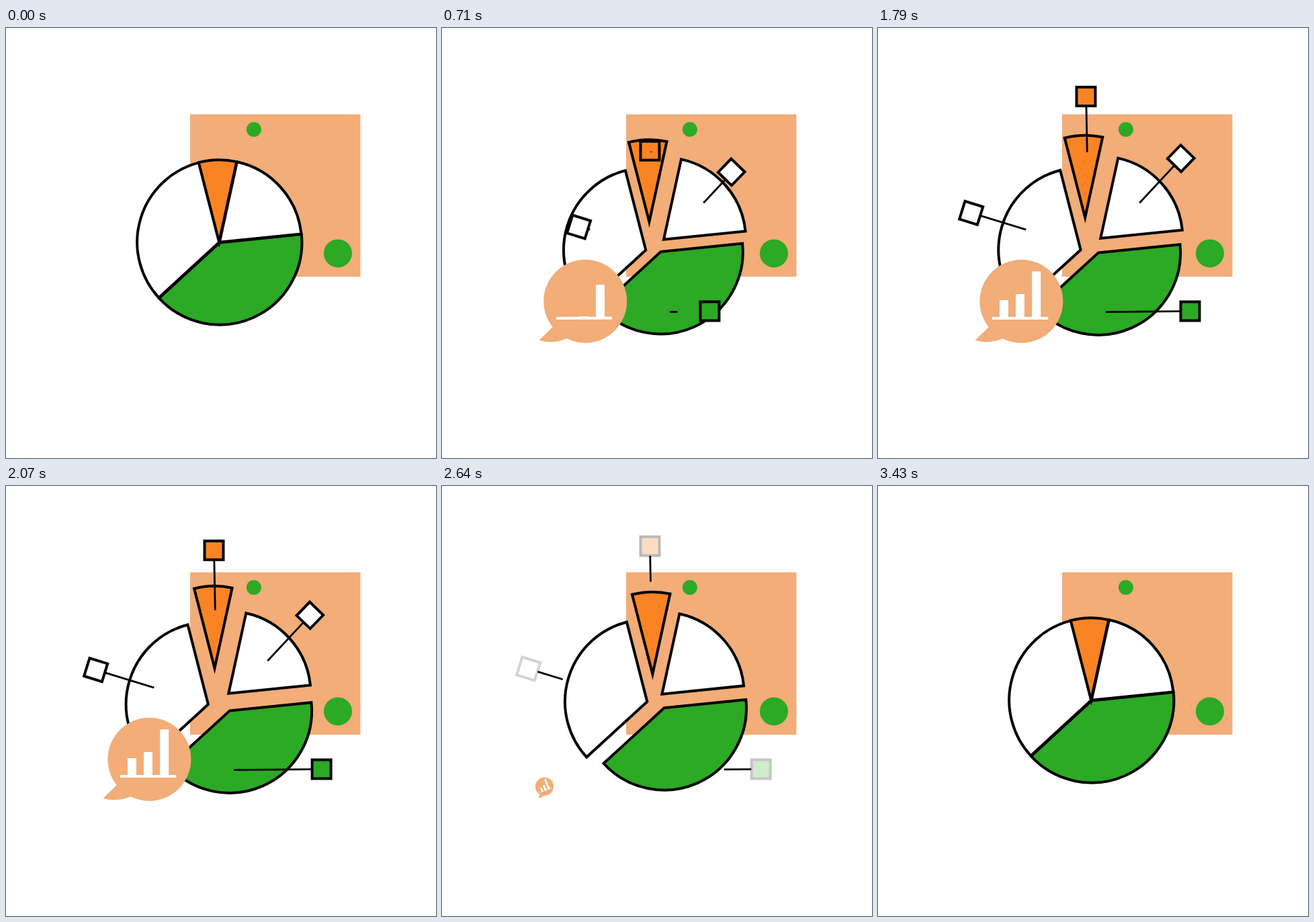
Write an HTML page that moves like this. It is 640 by 640 pixels and loops after 3570 ms.

```html
<!DOCTYPE html>
<html lang="en">
<head>
<meta charset="utf-8">
<title>Pie chart</title>
<style>
  html, body { margin: 0; width: 100%; height: 100%; overflow: hidden; background: #fff; }
  svg { display: block; width: 100vw; height: 100vh; }
</style>
</head>
<body>
<svg id="stage" viewBox="0 0 640 640">
  <rect x="274" y="128.5" width="253.5" height="241.7" fill="#f2ad78"/>
  <circle cx="368.9" cy="151" r="11" fill="#2ca925"/>
  <circle cx="494" cy="335.4" r="21" fill="#2ca925"/>
  <g id="slices" stroke="#000" stroke-width="4" stroke-miterlimit="10"></g>
  <g id="tags" stroke="#000"></g>
  <g id="bubble" fill="#f2ad78">
    <circle cx="213.4" cy="406.8" r="62"/>
    <path d="M144.7 464.7L168 442L190 460.5Q166 471.500 144.700 464.700Z"/>
    <g id="bars" fill="#fff"><rect x="170" y="430" width="83.300" height="4"/></g>
  </g>
</svg>
<script>
const LOOP = 3570, STEP = 71.4, LAST_STEP = 48;
const CENTER = [317.5, 318.8], RADIUS = 122.3;
const GREEN = '#2ca925', ORANGE = '#fa8423', WHITE = '#fff';

const byId = id => document.getElementById(id);
const clamp = v => Math.min(1, Math.max(0, v));
const span = (t, from, to) => clamp((t - from) / (to - from));
const easeOut = u => 1 - (1 - u) ** 3;
const easeInOut = u => (1 - Math.cos(Math.PI * u)) / 2;
const mix = (a, b, k) => a + (b - a) * k;
const mixPoint = (p, q, k) => [mix(p[0], q[0], k), mix(p[1], q[1], k)];

function add(parent, name, attrs) {
  const node = document.createElementNS('http://www.w3.org/2000/svg', name);
  set(node, attrs);
  return parent.appendChild(node);
}

function set(node, attrs) {
  for (const key in attrs) node.setAttribute(key, attrs[key]);
}

function wedge(from, to) {
  const rim = deg => {
    const a = deg * Math.PI / 180;
    return [CENTER[0] + RADIUS * Math.cos(a), CENTER[1] + RADIUS * Math.sin(a)];
  };
  return `M${CENTER}L${rim(from)}A${RADIUS} ${RADIUS} 0 0 1 ${rim(to)}Z`;
}

// open: offset after the pie bursts; far: offset just before it closes
const slices = [
  { from: 137.5, to: 255.6, fill: WHITE, rest: [0, 0], open: [-15.7, 13], far: [-17, 3] },
  { from: -77.7, to: -5.8, fill: WHITE, rest: [0.3, 0], open: [13.5, -4.4], far: [13.5, -12.7] },
  { from: -5.8, to: 137.5, fill: GREEN, rest: [0.6, 0.6], open: [8.2, 15.2], far: [17.7, 15.2] },
  { from: -104.4, to: -77.7, fill: ORANGE, rest: [-0.3, -0.2], open: [-9.7, -33.3], far: [-5.3, -54] }
];
for (const s of slices) {
  s.node = add(byId('slices'), 'path', { d: wedge(s.from, s.to), fill: s.fill });
}

// root: inner line end; near and end: the square's path; grow, undraw, fade: time spans
const tags = [
  { root: [220.3, 300.2], near: [204.2, 296.3], end: [128.4, 272], turn: 17.3, fill: WHITE,
    grow: [500, 700], undraw: [2370, 2890], fade: [2310, 2710] },
  { root: [389.3, 260.3], near: [430.5, 214.7], end: [454, 190.8], turn: 44, fill: WHITE,
    grow: [500, 700], undraw: [2220, 2640], fade: [2070, 2470] },
  { root: [339, 422.6], near: [397.8, 421.5], end: [475, 421.5], turn: 0, fill: GREEN,
    grow: [640, 930], undraw: [2325, 2800], fade: [2330, 2730] },
  { root: [311.3, 184.8], near: [309.5, 183.5], end: [309.5, 89.2], turn: 0, fill: ORANGE,
    grow: [500, 700], undraw: [2370, 2890], fade: [2350, 2750] }
];
for (const tag of tags) {
  tag.square = add(byId('tags'), 'rect',
    { x: -14, y: -14, width: 28, height: 28, fill: tag.fill, 'stroke-width': 4 });
  tag.line = add(byId('tags'), 'line', { 'stroke-width': 2.8 });
}

const bars = [
  { x: 181, height: 27, time: [700, 1850] },
  { x: 205, height: 36, time: [690, 1590] },
  { x: 229.2, height: 69.7, time: [560, 1010] }
];
for (const bar of bars) {
  bar.node = add(byId('bars'), 'rect', { x: bar.x, width: 13, y: 432, height: 0 });
}

function drawSlices(t) {
  const burst = t < 40 ? 0 : 1 - Math.exp(-(t - 40) / 290);
  const drift = easeInOut(span(t, 1574, 2375));
  const stay = 1 - easeInOut(span(t, 2375, 3119));
  for (const s of slices) {
    const [x, y] = mixPoint(s.open, s.far, drift).map((v, i) => v * burst * stay + s.rest[i]);
    set(s.node, { transform: `translate(${x} ${y})` });
  }
}

function drawTag(tag, t) {
  const left = 1 - Math.min(1, (t - 710) / 2090);
  const [x, y] = mixPoint(tag.end, tag.near, 0.57 * left ** 2 + 0.43 * left ** 8);
  const opacity = span(t, 520, 690) * (1 - span(t, ...tag.fade));
  set(tag.square, { transform: `translate(${x} ${y}) rotate(${tag.turn})`, opacity });

  const [rx, ry] = tag.root;
  const dx = tag.end[0] - rx, dy = tag.end[1] - ry, size = Math.hypot(dx, dy);
  const reach = ((x - rx) * dx + (y - ry) * dy) / size - 14.5;
  const tip = Math.max(1, reach * span(t, ...tag.grow));
  const tail = tip * span(t, ...tag.undraw);
  const along = d => [rx + dx / size * d, ry + dy / size * d];
  const [x1, y1] = along(tail), [x2, y2] = along(tip);
  set(tag.line, { x1, y1, x2, y2, visibility: t > 600 && tip > tail ? 'visible' : 'hidden' });
}

function drawBubble(t) {
  const scale = easeOut(span(t, 90, 760)) * (1 - span(t, 2200, 2700) ** 2);
  const turn = -22 * (1 - scale ** 15);
  set(byId('bubble'), {
    transform: `translate(143 465) rotate(${turn}) scale(${scale}) translate(-143 -465)`,
    visibility: scale > 0 ? 'visible' : 'hidden'
  });
  for (const bar of bars) {
    const height = bar.height * easeOut(span(t, ...bar.time));
    set(bar.node, { y: 432 - height, height });
  }
}

function draw(now) {
  const step = Math.min(LAST_STEP, Math.floor((now % LOOP + 5) / STEP));
  const t = step * STEP;
  drawSlices(t);
  tags.forEach(tag => drawTag(tag, t));
  drawBubble(t);
}

let start;
function tick(now) {
  start ??= now;
  draw(now - start);
  requestAnimationFrame(tick);
}
draw(0);
requestAnimationFrame(tick);
</script>
</body>
</html>
```
